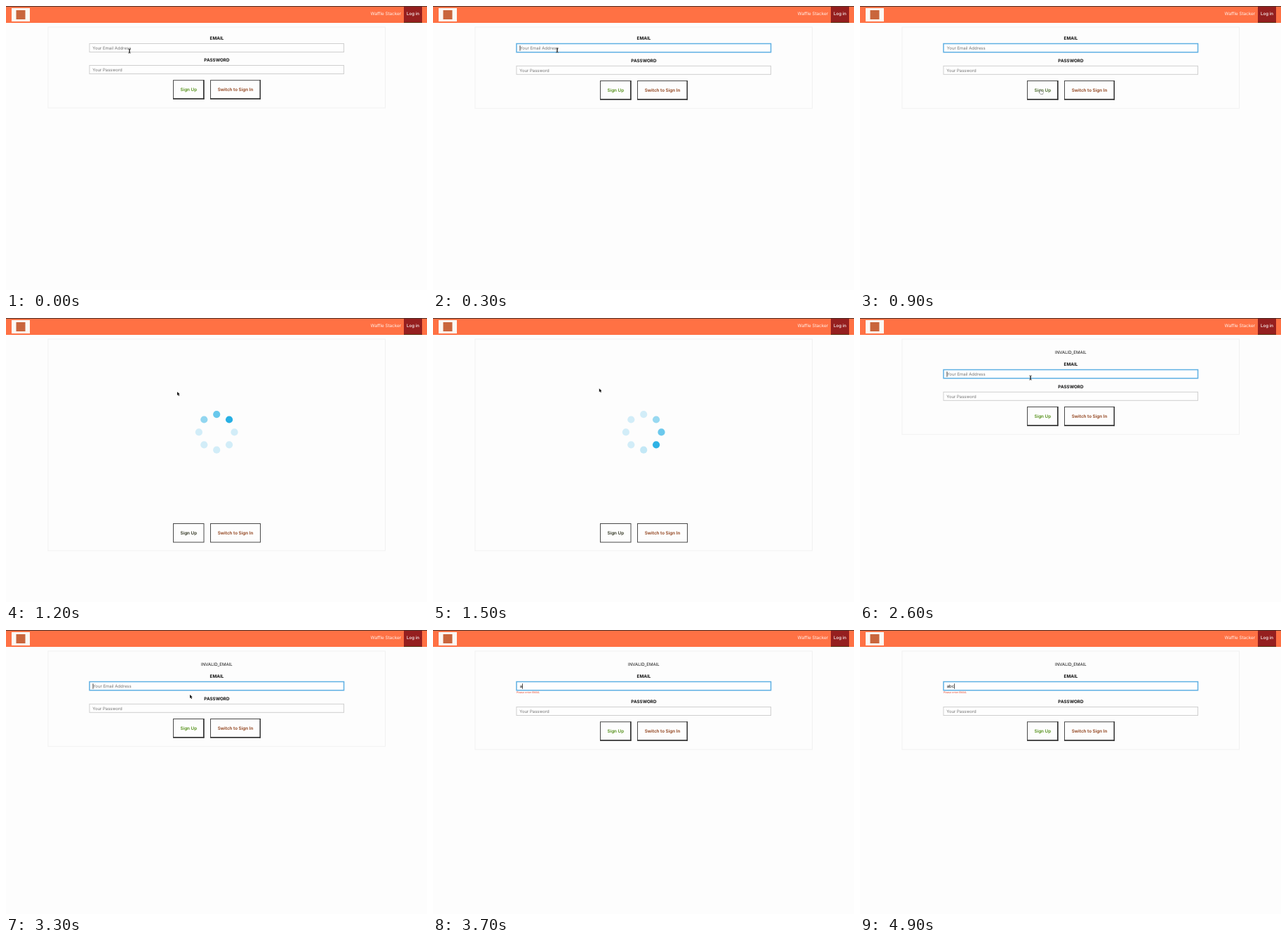
An HTML page with a canvas that plays this animation: 600 px wide and 404 px high, repeating every 5 s.

```html
<!DOCTYPE html>
<html lang="en">
<head>
<meta charset="utf-8">
<title>Sign-up form</title>
<style>
  html, body { margin: 0; width: 100%; height: 100%; overflow: hidden; background: #fdfdfd; }
  canvas { display: block; width: 600px; height: 404px; }
</style>
</head>
<body>
<canvas id="stage"></canvas>
<script>
const canvas = document.getElementById('stage');
const ctx = canvas.getContext('2d');
const LOOP = 5000, STEP = 100;
const FOCUS_1 = 200, BLUR = 1200, RELOAD = 1700, FOCUS_2 = 2300, TYPE = 3700;
const GREEN = '#4f8d12', BROWN = '#8c3a12';

// pointer route: time, x, y
const ROUTE = [
  [0, 176, 64], [100, 177, 63], [500, 177, 63], [600, 190, 74], [700, 222, 99],
  [800, 250, 117], [900, 258, 122], [1100, 258, 121], [1200, 244, 105],
  [1700, 232, 97], [2000, 214, 82], [2200, 208, 77], [2300, 208, 78],
  [2600, 243, 85], [2800, 258, 90], [3000, 262, 92]
];

function rect(x, y, w, h, color) {
  ctx.fillStyle = color;
  ctx.fillRect(x, y, w, h);
}

function frame(x, y, w, h, color, line = 1) {
  ctx.strokeStyle = color;
  ctx.lineWidth = line;
  ctx.strokeRect(x + line / 2, y + line / 2, w - line, h - line);
}

function text(str, x, y, { size = 6, weight = 400, color = '#111', align = 'left' } = {}) {
  ctx.font = `${weight} ${size}px Inter, "Liberation Sans", sans-serif`;
  ctx.textAlign = align;
  ctx.fillStyle = color;
  ctx.fillText(str, x, y);
}

function header() {
  rect(0, 0, 600, 24, '#ff7144');
  rect(0, 0, 600, 1, '#4c3028');
  rect(8, 3, 26, 19, '#fbf8f4');
  rect(14.5, 6, 13, 13, '#c9653c');
  rect(567, 1, 26, 23, '#951f1f');
  rect(567, 23, 26, 1, '#5a3a14');
  text('Waffle Stacker', 563, 12.8, { size: 6.3, color: '#fff2ec', align: 'right' });
  text('Log in', 580, 12.8, { size: 6.2, weight: 500, color: '#fff', align: 'center' });
}

function panel(bottom) {
  rect(60, 30, 481, bottom - 30, '#fdfdfd');
  frame(59.5, 29.5, 481.5, bottom - 29.5, '#f1f1f1');
}

function label(str, y) {
  text(str, 300.4, y, { size: 6.25, weight: 700, align: 'center' });
}

function field(y, focused) {
  rect(118.5, y, 363.5, 13, '#fefefe');
  if (focused) frame(118.3, y - 0.2, 364, 13.7, '#5fb0e3', 1.5);
  else frame(118.5, y, 363.5, 13, '#cfcfcf');
}

function button(str, x, y, w, color, flat) {
  rect(x, y, w, 27.5, '#fdfdfd');
  frame(x, y, w, 27.5, '#4a4a4a');
  if (!flat) {
    rect(x + w - 1.5, y, 1.5, 27.5, '#333');
    rect(x, y + 26, w, 1.5, '#333');
  }
  text(str, x + w / 2, y + 16, { size: 6.3, weight: 600, color, align: 'center' });
}

function buttons(y, upColor, flat) {
  button('Sign Up', 238, y, 44.5, upColor, flat);
  button('Switch to Sign In', 291, y, 72, BROWN, flat);
}

function ease(p) {
  return p * p * (3 - 2 * p);
}

function dotAlpha(rel) {
  return [1, 0.7, 0.5][(rel + 16) % 8] ?? 0.2;
}

function spinner(ms) {
  const phase = ms / 1100 * 8;
  const key = Math.floor(phase), mix = ease(phase - key);
  for (let i = 0; i < 8; i++) {
    const a = dotAlpha(key - i), b = dotAlpha(key + 1 - i);
    const turn = i * Math.PI / 4;
    ctx.fillStyle = `rgba(40,176,228,${a + (b - a) * mix})`;
    ctx.beginPath();
    ctx.arc(300.2 + 25.3 * Math.sin(turn), 162.4 - 25.3 * Math.cos(turn), 5.1, 0, 7);
    ctx.fill();
  }
}

function caretOn(t, since) {
  return Math.floor((t - since) / 500) % 2 === 0;
}

function form(t, hover) {
  const failed = t >= RELOAD;
  const focused = failed ? t >= FOCUS_2 : t >= FOCUS_1;
  const typed = 'abc'.slice(0, t < TYPE ? 0 : 1 + Math.floor((t - TYPE) / STEP));
  const top = failed ? 20 : 0;
  const low = top + (typed ? 5 : focused ? 0.8 : 0);
  const nudge = focused ? 0.4 : 0;

  panel(145.5 + low);
  if (failed) text('INVALID_EMAIL', 300.4, 50.8, { align: 'center', size: 6.05 });
  label('EMAIL', 48.4 + top);
  field(53 + top, focused);
  text(typed || 'Your Email Address', 123.3 + nudge, 61.7 + top + nudge,
    { color: typed ? '#111' : '#737373' });

  if (focused) {
    const since = typed ? Math.min(t, TYPE + 2 * STEP) : failed ? FOCUS_2 : FOCUS_1;
    const x = 123.6 + (typed ? ctx.measureText(typed).width + 0.2 : 0);
    if (caretOn(t, since)) rect(x, 56.2 + top, 0.8, 7.6, '#222');
  }
  if (typed) text('Please enter EMAIL', 119, 90.2, { size: 3.6, color: '#e2452f' });

  label('PASSWORD', 79.4 + low);
  field(84 + low, false);
  text('Your Password', 123.3, 92.7 + low, { color: '#737373' });
  buttons(105.2 + low, hover ? '#41651f' : GREEN);
}

function pointerAt(t) {
  const next = ROUTE.findIndex(p => p[0] > t);
  if (next < 0) return ROUTE[ROUTE.length - 1].slice(1);
  const [t0, x0, y0] = ROUTE[next - 1], [t1, x1, y1] = ROUTE[next];
  const k = (t - t0) / (t1 - t0);
  return [x0 + (x1 - x0) * k, y0 + (y1 - y0) * k];
}

function shape(x, y, d, fill, line) {
  const path = new Path2D(d);
  ctx.save();
  ctx.translate(x, y);
  ctx.lineWidth = line;
  ctx.strokeStyle = fill === '#fff' ? '#222' : '#fff';
  ctx.stroke(path);
  ctx.fillStyle = fill;
  ctx.fill(path);
  ctx.restore();
}

function iBeam(x, y) {
  ctx.strokeStyle = '#222';
  ctx.lineWidth = 0.9;
  ctx.stroke(new Path2D(`M${x - 1.6} ${y - 3}q1.6 0 1.6 1v4q0 1 -1.6 1m3.2 0q-1.6 0 -1.6 -1v-4q0 -1 1.6 -1`));
}

function pointer(x, y, kind) {
  if (kind === 'text') iBeam(x, y);
  else if (kind === 'hand') {
    shape(x, y, 'M-1.4-2.6q.7-.6 1.2.1v1.7l2.6.6q.7.3.6 1.1l-.6 2.5h-2.9l-2-2.5q0-.8.9-.4z', '#fff', 0.9);
  } else shape(x, y, 'M0 0v5l1.2-1 .9 1.9 1-.5-.9-1.8h1.6z', '#111', 0.7);
}

function draw(t) {
  const [x, y] = pointerAt(t);
  const loading = t >= BLUR && t < RELOAD;
  const top = t >= RELOAD ? 20 : 0;
  const onButton = !loading && x > 238 && x < 282 && y > 105 + top && y < 133 + top;
  const onField = !loading && [53, 84].some(f => y > f + top && y < f + top + 13);

  rect(0, 0, 600, 404, '#fdfdfd');
  header();
  if (loading) {
    panel(331.5);
    spinner(t - BLUR + 137.5);
    buttons(292, '#2b2f1c', true);
  } else form(t, onButton);
  if (t < TYPE) pointer(x, y, onButton ? 'hand' : onField ? 'text' : 'arrow');
}

const dpr = window.devicePixelRatio || 1;
canvas.width = 600 * dpr;
canvas.height = 404 * dpr;
ctx.scale(dpr, dpr);
ctx.textRendering = 'geometricPrecision';

const start = performance.now();
function tick() {
  const t = (performance.now() - start) % LOOP;
  draw(Math.floor(t / STEP) * STEP);
  requestAnimationFrame(tick);
}
tick();
</script>
</body>
</html>
```
